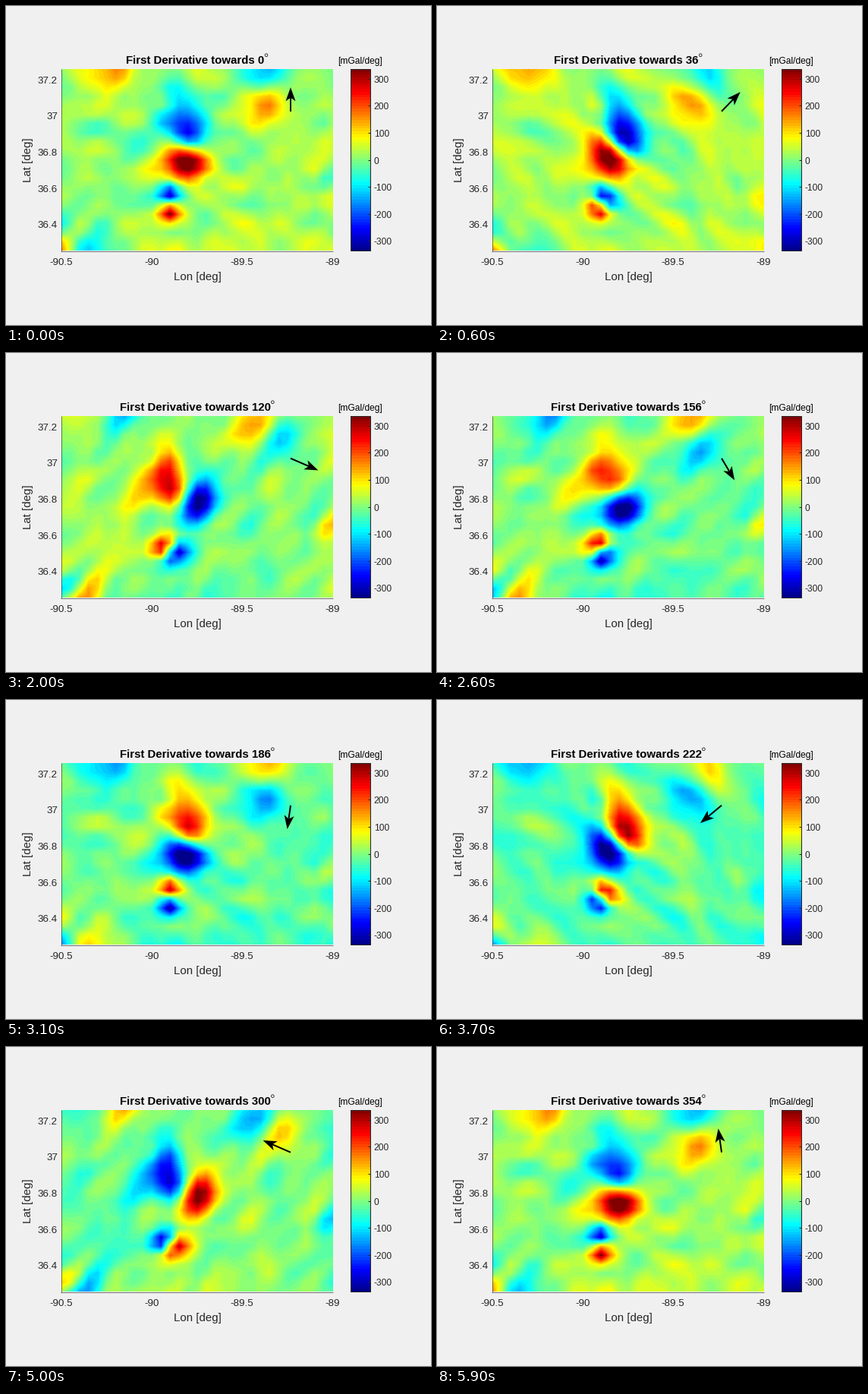
These frames come from a looping animation (560 by 420 pixels, 6 s). A matplotlib script:

```python
import numpy as np
import matplotlib.pyplot as plt
from matplotlib.animation import FuncAnimation
from matplotlib.colors import ListedColormap
from matplotlib.patches import Ellipse, Polygon

W, H, DPI = 560, 420, 100
FRAMES, INTERVAL = 60, 100
LEFT, RIGHT, TOP, BOTTOM = 73, 431, 83, 322
COLS, ROWS = 31, 21
LIMIT = 336  # end of the colour scale
SLOPE, ROUGHNESS = 20, 100
GREY = "#262626"
PT = 72 / DPI  # points per pixel

plt.rcParams["font.family"] = "Liberation Sans"

# Gravity highs on the survey grid: column, row, spread, height
HIGHS = [
    (13, 7, 1.7, 610), (14, 9, 1.6, 780), (11.9, 14.7, 0.75, 700),
    (9.3, 9.8, 1.1, 220), (12.5, 3.8, 1.1, 250), (22.8, 2.2, 1.7, 410),
    (5.4, -1.2, 1.9, 450), (4, 21.2, 1.6, 380), (0, 18, 1.2, 220),
    (19, 12.3, 2, 130), (8, 17, 6, 300),
]


def jet(n):
    t = (np.arange(n) + 0.75) / n
    rgb = [np.clip(1.5 - abs(4 * t - c), 0, 1) for c in (3, 2, 1)]
    return ListedColormap(np.column_stack(rgb))


def smooth(a, axis):
    return (np.roll(a, 1, axis) + 2 * a + np.roll(a, -1, axis)) / 4


def gravity():
    x, y = np.meshgrid(np.arange(COLS), np.arange(ROWS))
    grain = np.random.default_rng(4).normal(size=x.shape)
    g = SLOPE * (x - y) + ROUGHNESS * smooth(smooth(grain, 0), 1)
    for cx, cy, s, h in HIGHS:
        g += h * np.exp(-((x - cx) ** 2 + (y - cy) ** 2) / (2 * s * s))
    return g


def resample(a, n, axis):
    """Linear interpolation onto n pixel centres along one axis."""
    k = a.shape[axis]
    at = (np.arange(n) + 0.5) / n * (k - 1)
    return np.apply_along_axis(lambda v: np.interp(at, np.arange(k), v), axis, a)


def to_pixels(a):
    return resample(resample(a, BOTTOM - TOP, 0), RIGHT - LEFT, 1)


south, east = map(to_pixels, np.gradient(gravity()))

fig = plt.figure(figsize=(W / DPI, H / DPI), dpi=DPI, facecolor="#f0f0f0")
ax = fig.add_axes([0, 0, 1, 1])
style = dict(cmap=jet(64), aspect="auto", interpolation="nearest")
image = ax.imshow(-south, extent=(LEFT, RIGHT, BOTTOM, TOP),
                  vmin=-LIMIT, vmax=LIMIT, **style)
ax.imshow(np.arange(64)[::-1, None], extent=(454, 480, BOTTOM, TOP), **style)
ax.set(xlim=(0, W), ylim=(H, 0))
ax.axis("off")


def label(x, y, s, px, ha="center", color=GREY, va="baseline", **kw):
    return ax.text(x, y, s, fontsize=px * PT, ha=ha, va=va, color=color, **kw)


def line(xs, ys, px=1.0):
    ax.plot(xs, ys, color=GREY, lw=px * PT, solid_capstyle="butt")


# Axis lines, tick labels and axis titles
line([72.5, 72.5], [TOP, BOTTOM + 1], 0.6)
line([72, RIGHT], [BOTTOM + 0.5] * 2, 0.6)
for i in range(4):
    label(72.5 + i * (RIGHT - LEFT) / 3, 341.4, f"{-90.5 + i / 2:g}", 13.33)
for i in range(5):
    label(68, 101.5 + 47.7 * i, f"{37.2 - i / 5:.3g}", 13.33, ha="right")
label(252, 361.5, "Lon [deg]", 15)
label(28.5, 203, "Lat [deg]", 15, rotation=90, va="center")

# Colour scale
x0, x1, y0, y1 = 453.5, 479.5, 82.5, 321.5
line([x0, x1, x1, x0, x0], [y0, y0, y1, y1, y0])
for v in range(-300, 301, 100):
    y = (TOP + BOTTOM) / 2 - v * (BOTTOM - TOP) / (2 * LIMIT)
    line([477, 480], [y, y])
    label(484.7, y + 5, str(v), 12, ha="left")
label(466.8, 76, "[mGal/deg]", 12, color="black")

title = label(249, 76, "", 15, color="black", weight="bold")
ring = ax.add_patch(Ellipse((0, 0), 3.7, 3.7, fill=False, ec="black", lw=0.7 * PT))

# Direction arrow with a notched head
TAIL = np.array([375, 138.7])
shaft, = ax.plot([], [], color="black", lw=2 * PT, solid_capstyle="butt")
head = ax.add_patch(Polygon(np.zeros((4, 2)), fc="black", lw=0))


def update(i):
    deg = 360 * i // FRAMES
    a = np.radians(deg)
    image.set_data(east * np.sin(a) - south * np.cos(a))

    text = str(deg)
    title.set_text("First Derivative towards " + text)
    ring.center = (343 + 4.17 * (len(text) - 1), 64.7)

    reach = 0.075 * np.array([W * np.sin(a), -H * np.cos(a)])
    tip = TAIL + reach
    u = reach / np.hypot(*reach)
    side = 6.5 * np.array([-u[1], u[0]])
    notch, back = tip - 13.5 * u, tip - 18 * u
    shaft.set_data(*zip(TAIL, notch))
    head.set_xy([tip, back + side, notch, back - side])
    return image, title, ring, shaft, head


anim = FuncAnimation(fig, update, frames=FRAMES, interval=INTERVAL,
                     repeat=True, repeat_delay=0, blit=False)
plt.show()
```
